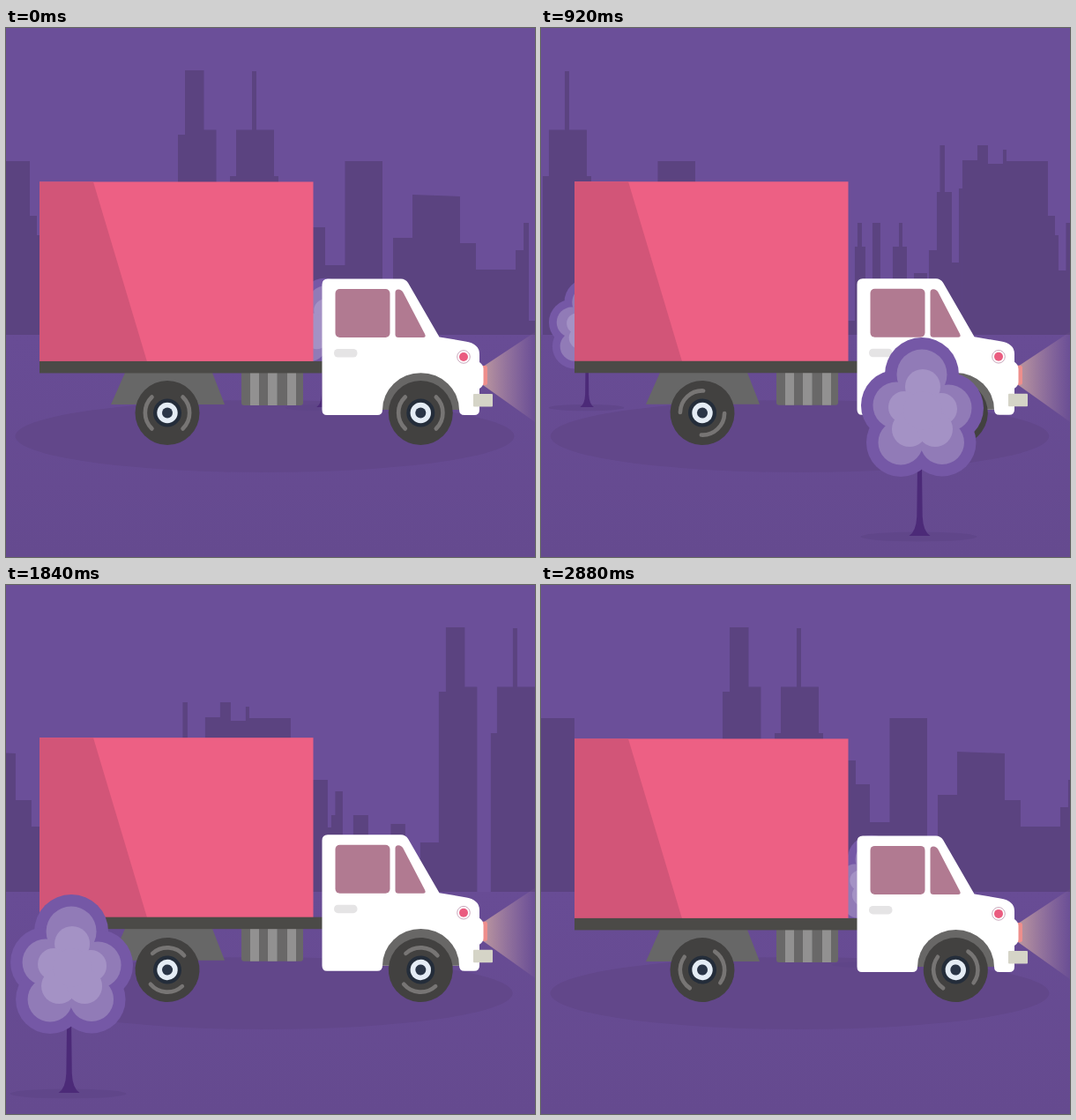
An HTML page that plays this animation: 600 by 600 pixels, repeating every 2920 ms.

```html
<!DOCTYPE html>
<html lang="en">
<head>
<meta charset="utf-8">
<title>Truck drive</title>
<style>
  html, body { margin: 0; width: 100%; height: 100%; overflow: hidden; background: #6b4f99; }
  svg { display: block; width: 100vw; height: 100vh; }
</style>
</head>
<body>
<svg viewBox="0 0 600 600">
  <defs>
    <linearGradient id="soil" x2="0" y2="1">
      <stop stop-color="#684c95"/>
      <stop offset="1" stop-color="#654a8f"/>
    </linearGradient>
    <linearGradient id="beam" gradientUnits="userSpaceOnUse" x1="541" x2="600" y1="0" y2="0">
      <stop stop-color="#f4c9a6" stop-opacity=".6"/>
      <stop offset="1" stop-color="#d9b3b4" stop-opacity=".03"/>
    </linearGradient>
    <path id="city" d="M-70 348V150H-53V133H-41V154H-24V138H-20V151H27V213H35V235H39V275H47.5V221H69V275H73V261H77.5V234H86V300H98V261H115V322H120V304H123V288H140.5V271H157V320H165V310H174V292H195V121H203V48H224.5V115.5H238.5V348H254V168H261V115.5H279V49H284V115.5H304V168H309V308H322V199H346V226H362V269H384.5V151H427V296H439V238H461V189L515 191V244H533V274H578V252H587V221H593V332H608V248H611V221H616V248H620V332H628V221H637V292H642V315H651V248H658V221H662V248H667V304H675V278H690V348H692V252H701V186H704.5V133H710V186H718V266H726V182H730V348Z"/>
    <!-- origin: foot of the trunk -->
    <g id="tree">
      <ellipse cx="-1" cy="1" rx="66" ry="5.5" fill="#5f4588" opacity=".7"/>
      <path fill="#4c2a78" d="M-2.5-80H2.5L3.2-22Q4-5 12 0H-12Q-4-5-3.2-22Z"/>
      <g id="crown"></g>
    </g>
    <g id="wheel">
      <circle r="36.5" fill="#424140"/>
      <path d="M17.5-18A25 25 0 0 1 17.5 18M-17.5 18A25 25 0 0 1-17.5-18" fill="none" stroke="#777574" stroke-width="4.6" stroke-linecap="round"/>
      <circle r="16" fill="#242d3a"/>
      <circle r="11.7" fill="#e4ecf5"/>
      <circle r="6" fill="#2a3547"/>
    </g>
  </defs>

  <rect width="600" height="600" fill="#6b4f99"/>
  <rect y="348" width="600" height="252" fill="url(#soil)"/>
  <g id="skyline" fill="#5b4380">
    <use href="#city"/>
    <use href="#city" x="800"/>
  </g>
  <ellipse id="shade" cx="293.5" cy="463" rx="283" ry="41" fill="#62478a"/>
  <use id="farTree" href="#tree"/>

  <g id="body">
    <path fill="url(#beam)" d="M541 384L600 345V447L541 405Z"/>
    <rect x="38" y="174.5" width="310.5" height="204" fill="#ed6084"/>
    <path fill="#d25578" d="M38 174.5H99L160 378.5H38Z"/>
    <path fill="#676767" d="M135 391H234L248 427H119Z"/>
    <rect x="267" y="388" width="70" height="40" rx="3" fill="#696868"/>
    <path fill="#929191" d="M277 391h10v37h-10zM297 391h10.500v37h-10.500zM319 391h10v37h-10z"/>
    <rect x="38" y="378" width="322" height="13.500" fill="#4b4a47"/>
    <rect x="538" y="383" width="8" height="22" rx="2.500" fill="#ee8e8c"/>
    <path fill="#fff" d="M358.500 291Q358.500 284.500 365 284.500H448Q453 284.500 456 289L491.500 350.500L521 355.500Q537 358 537 370V379Q541.500 382 541.500 387V402Q541.500 406 537 409V433Q537 439 531 439H520Q514 439 514 433H427Q427 439 421 439H364Q358.500 439 358.500 433Z"/>
    <path fill="#686766" d="M427 433A43.500 41.800 0 0 1 514 433Z"/>
    <rect x="373.500" y="296" width="62" height="55" rx="5" fill="#b17a91"/>
    <path fill="#b17a91" d="M441.500 300Q441.500 296.500 445 296.500Q448.500 296.500 450.500 300L475 347Q477 351 473 351H445Q441.500 351 441.500 347.500Z"/>
    <rect x="372" y="364" width="26.500" height="9.500" rx="4.500" fill="#e5e4e5"/>
    <circle cx="519" cy="373" r="7.300" fill="#fff" stroke="#c9a9bd"/>
    <circle cx="519" cy="373" r="5" fill="#ea5c80"/>
    <rect x="530" y="415" width="22" height="14.500" rx="1" fill="#d5d4c7"/>
  </g>
  <use class="wheel" href="#wheel"/>
  <use class="wheel" href="#wheel"/>
  <use id="nearTree" href="#tree"/>
</svg>
<script>
const LOOP = 2920, STEP = 40;
const $ = id => document.getElementById(id);
const move = (el, value) => el.setAttribute('transform', value);

// Each crown layer is a cluster of overlapping circles: [x, y, radius].
const lobes = [[2.5, -183, 42], [-26.5, -148, 40], [32.5, -145, 40], [-21.5, -106, 39], [25.5, -106, 38.5], [3, -140, 40]];
const core = [[3.5, -169, 20], [-17.5, -146, 18], [24.5, -144, 18], [-11.5, -121, 20], [17.5, -121, 20], [3.5, -142, 22]];
const layer = (list, inset, fill) => `<g fill="${fill}">` +
  list.map(([x, y, r]) => `<circle cx="${x}" cy="${y}" r="${r - inset}"/>`).join('') + '</g>';
$('crown').innerHTML = layer(lobes, 0, '#7558a6') + layer(lobes, 13.5, '#917bb7') + layer(core, 0, '#a492c5');

const wheels = [...document.querySelectorAll('.wheel')];

function draw(t) {
  const p = t / LOOP;
  const lift = 2.2 * (1 - Math.cos(2 * Math.PI * (6 * p + .035)));
  const farX = (610 + 977 - 977 * p) % 977 - 250;

  move($('skyline'), `translate(${-800 * p})`);
  move($('farTree'), `translate(${farX} 430) scale(.65)`);
  move($('nearTree'), `translate(${787.4 - 1136 * p} 576)`);
  move($('body'), `translate(0 ${-lift})`);
  $('shade').setAttribute('rx', 283 - 1.4 * lift);
  wheels.forEach((w, i) => move(w, `translate(${i ? 470.3 : 183} 436.5) rotate(${720 * p})`));
}

const start = performance.now();
function tick() {
  const t = Math.max(0, performance.now() - start);
  draw(Math.floor(t / STEP + .01) * STEP % LOOP);
  requestAnimationFrame(tick);
}
tick();
</script>
</body>
</html>
```
